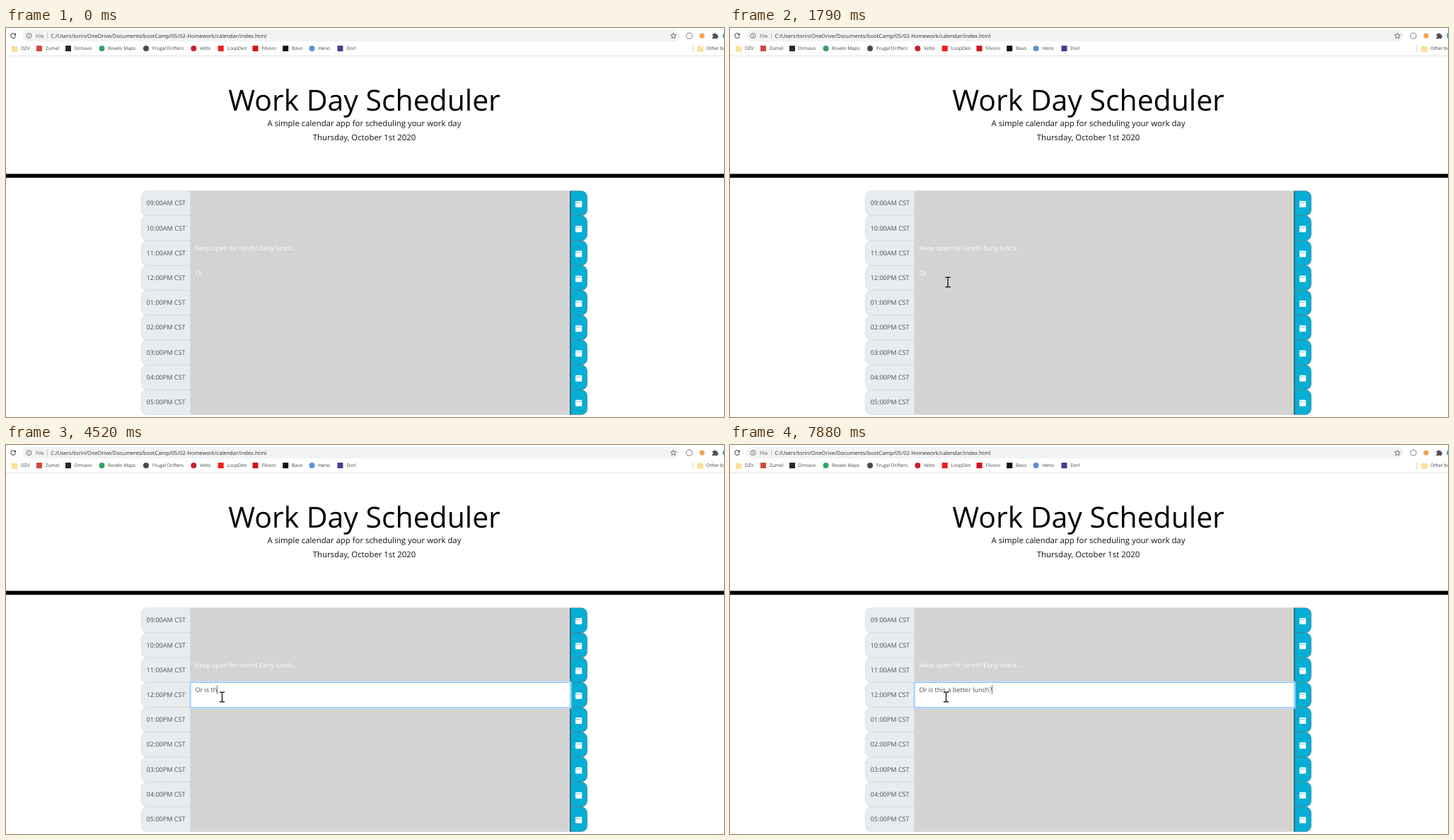
An HTML page that plays this animation: 1015 by 551 pixels, repeating every 8 s.

```html
<!DOCTYPE html>
<html lang="en">
<head>
<meta charset="utf-8">
<title>Work Day Scheduler</title>
<style>
  html, body { margin: 0; height: 100%; overflow: hidden; background: #fff; }
  svg { display: block; width: 100vw; height: 100vh; }
  text { font: 9.1px "Open Sans", sans-serif; white-space: pre; text-rendering: geometricPrecision; }
</style>
</head>
<body>
<svg id="stage" viewBox="0 0 1015 551"></svg>
<script>
const LOOP = 8000, TOP = 230.8, PITCH = 35.22, LEFT = 191.3, FIELD = 260.9, SAVE = 797.6, RIGHT = 821.6;
const TEXT_X = 267.4, ACTIVE = 3;
const stage = document.getElementById('stage');

function add(tag, attrs, parent = stage) {
  const el = document.createElementNS('http://www.w3.org/2000/svg', tag);
  for (const k in attrs) el.setAttribute(k, attrs[k]);
  return parent.appendChild(el);
}
const rect = (x, y, width, height, fill, more) => add('rect', { x, y, width, height, fill, ...more });
const disc = (cx, cy, r, fill, more) => add('circle', { cx, cy, r, fill, ...more });
const line = (d, stroke, width = 1, parent) =>
  add('path', { d, stroke, fill: 'none', 'stroke-width': width }, parent);
const shape = (d, fill, more, parent) => add('path', { d, fill, ...more }, parent);
function label(str, x, y, size, fill, more = {}) {
  const el = add('text', { x, y, fill, ...more });
  el.style.fontSize = size + 'px';
  el.textContent = str;
  return el;
}
const rowY = i => TOP + i * PITCH;

function folder(x) {
  shape(`M${x} 25.5h3l1 1h4.5v7h-8.5z`, '#fbd978');
  rect(x, 27.2, 8.5, 6.3, '#fce09a');
}

function browser() {
  // address bar
  rect(23, 3, 929, 16, '#f1f3f4', { rx: 8 });
  line('M13 8.8A3.4 3.4 0 1 0 13.6 11.6', '#4b4f53', 1.1);
  shape('M14 7v3.4h-3.4z', '#4b4f53');
  disc(32.5, 11, 3.5, 'none', { stroke: '#5f6368', 'stroke-width': .9 });
  line('M32.5 10.5v2.4M32.5 8.8v1', '#5f6368', .9);
  label('File', 42, 13.6, 7.3, '#5f6368');
  line('M58.5 6.5v9', '#b4b8bc', .7);
  label('C:/Users/torin/OneDrive/Documents/bootCamp/05/02-Homework/calendar/index.html', 63.2, 13.6, 7.54, '#2b2e32');
  line('M943.5 7l1.1 2.7 2.9.2-2.2 1.9.7 2.8-2.5-1.5-2.5 1.5.7-2.8-2.2-1.9 2.9-.2z', '#4b4f53', .8);
  disc(966, 11, 4.1, 'none', { stroke: '#6d7175', 'stroke-width': .9 });
  disc(984, 11, 3.6, '#f6a04d');
  shape('M998.5 8.5h2.2a1.3 1.3 0 1 1 2.6 0h2.2v2.3a1.3 1.3 0 1 1 0 2.5v2h-2.4a1.2 1.2 0 0 0-2.3 0h-2.3v-2.3a1.2 1.2 0 0 0 0-2.4z', '#4b4f53');
  disc(1018, 11, 5, '#4a9fd8');

  // bookmarks: icon x, colour, round, text x, name
  folder(8);
  label('DZV', 21, 31.3, 6.6, '#3c4043');
  [
    [47, '#d5473c', 0, 56, 'Zumel'],
    [88, '#2b2a28', 0, 96.3, 'Ormavo'],
    [135.5, '#34a168', 1, 144, 'Rovelo Maps'],
    [198, '#4a4a4a', 1, 207, 'Frugal Drifters'],
    [265.3, '#c8202f', 1, 274, 'Velto'],
    [303.7, '#f01d1d', 0, 312.5, 'LoopDen'],
    [352.5, '#d5121c', 0, 361.5, 'Filvoro'],
    [395.2, '#0c1418', 0, 404, 'Bavo'],
    [432.5, '#5b93d0', 1, 441.5, 'Heno'],
    [472.5, '#4f3a96', 0, 481.5, 'Dorl']
  ].forEach(([cx, fill, round, x, name]) => {
    round ? disc(cx, 29, 4, fill) : rect(cx - 4, 25, 8, 8, fill);
    label(name, x, 31.3, 6.6, '#3c4043');
  });
  line('M970.8 24v10', '#c4c7ca', .8);
  folder(977.5);
  label('Other bookmarks', 990, 31.3, 6.6, '#3c4043');
  rect(0, 39, 1015, .8, '#d9dbde');
}

function page() {
  const mid = { 'text-anchor': 'middle' };
  label('Work Day Scheduler', 506.5, 117, 40.93, '#000', mid);
  label('A simple calendar app for scheduling your work day', 506.5, 138.8, 11.37, '#111', mid);
  label('Thursday, October 1st 2020', 506.5, 159.4, 11.37, '#111', mid);
  rect(0, 206.6, 1015, 5.6, '#000');

  const edge = { stroke: '#ced4da', 'stroke-width': .6 }, r = 8.5;
  for (let i = 0; i < 9; i++) {
    const y = rowY(i), h = PITCH, hour = (i + 8) % 12 + 1;
    shape(`M${FIELD} ${y}H${LEFT + r}a${r} ${r} 0 0 0 ${-r} ${r}v${h - 2 * r}a${r} ${r} 0 0 0 ${r} ${r}H${FIELD}z`, '#e9ecef', edge);
    label(`${String(hour).padStart(2, '0')}:00${i < 3 ? 'AM' : 'PM'} CST`, 198.6, y + 20.5, 9.1, '#495057');
    rect(FIELD, y, SAVE - FIELD, h, '#d3d3d1', edge);
    shape(`M${SAVE} ${y}H${RIGHT - r}a${r} ${r} 0 0 1 ${r} ${r}v${h - 2 * r}a${r} ${r} 0 0 1 ${-r} ${r}H${SAVE}z`,
      '#06aed5', { stroke: '#5d7480', 'stroke-width': .6 });
    line(`M${SAVE + .2} ${y}v${h}`, '#10242c', .8);
    rect(805, y + 14.3, 9.2, 9, '#fff', { rx: 1.2 });
    line(`M805.5 ${y + 16.8}h7.6`, '#4cb9d4', .8);
  }
  label('Keep open for lunch! Early lunch...', TEXT_X, rowY(2) + 13.6, 9.1, '#fff');
}

browser();
page();

const y0 = rowY(ACTIVE);
const field = rect(FIELD, y0 + .3, SAVE - FIELD, PITCH - .6, '#fff');
const glow = rect(FIELD - .6, y0 - .6, SAVE - FIELD + 1.2, PITCH + 1.2, 'none', { stroke: '#bfdeff', 'stroke-width': 2.2 });
const ring = rect(FIELD, y0 + .1, SAVE - FIELD, PITCH - .2, 'none', { stroke: '#80bdff', 'stroke-width': .8 });
const spot = disc(302.5, 356, 10.4, '#f9ec66');
const entry = label('', TEXT_X, y0 + 13.6, 9.1, '#fff');
const caret = rect(0, 340, .9, 13, '#666');
const pointer = add('g', {});
const arrow = shape('M0 0v9.8l2.3-2.1 1.5 3.4 1.5-.7-1.5-3.3h3.1z', '#fff', { stroke: '#000', 'stroke-width': .6 }, pointer);
const beam = line('M-3.6-6.9h2.6l1 .7 1-.7h2.6M0-6.2v12.4M-3.6 6.9h2.6l1-.7 1 .7h2.6', '#000', 1.2, pointer);

// pointer stops: time, x, y
const stops = [
  [410, 990, 540], [487, 760, 420], [564, 520, 310], [641, 330, 230], [718, 200, 201], [795, 125, 215],
  [872, 128, 262], [949, 160, 300], [1026, 195, 315], [1103, 215, 319], [1180, 221.5, 319.5],
  [1250, 200, 340], [1330, 228, 372], [1410, 275, 391], [1490, 318, 381],
  [1640, 316, 370], [1720, 308, 360], [1800, 303.7, 357], [2190, 304.6, 357], [2260, 305.5, 357]
];
const PHRASE = 'Or is this a better lunch?';
const keys = [4060, 4140, 4290, 4370, 4520, 4690, 4840, 4920, 5070, 5220, 5540, 5620, 5850,
  6010, 6090, 6240, 6320, 6550, 6870, 7020, 7020, 7410, 7880];
const show = (el, on) => el.setAttribute('visibility', on ? 'visible' : 'hidden');

function draw(t) {
  const stop = stops.findLast(s => s[0] <= t);
  show(pointer, stop);
  if (stop) {
    const [, x, y] = stop;
    const overRow = x > LEFT && x < RIGHT && y > TOP;
    pointer.setAttribute('transform', `translate(${x} ${y})`);
    arrow.style.display = overRow ? 'none' : '';
    beam.style.display = overRow ? '' : 'none';
  }

  const focused = t >= 1870;
  const strength = t < 1990 ? 0 : t < 2030 ? .7 : 1;
  show(field, focused);
  glow.setAttribute('opacity', strength);
  ring.setAttribute('opacity', strength);
  show(spot, t >= 1800 && t < 2030);

  entry.textContent = PHRASE.slice(0, 3 + keys.filter(k => k <= t).length);
  entry.setAttribute('fill', focused ? '#495057' : '#fff');
  show(caret, focused && (t < 2430 || t >= 2960 && t < 3510 || t >= 4060));
  caret.setAttribute('x', Math.floor(TEXT_X + entry.getComputedTextLength()));
}

const start = performance.now();
function tick() {
  draw((performance.now() - start) % LOOP);
  requestAnimationFrame(tick);
}
tick();
</script>
</body>
</html>
```
